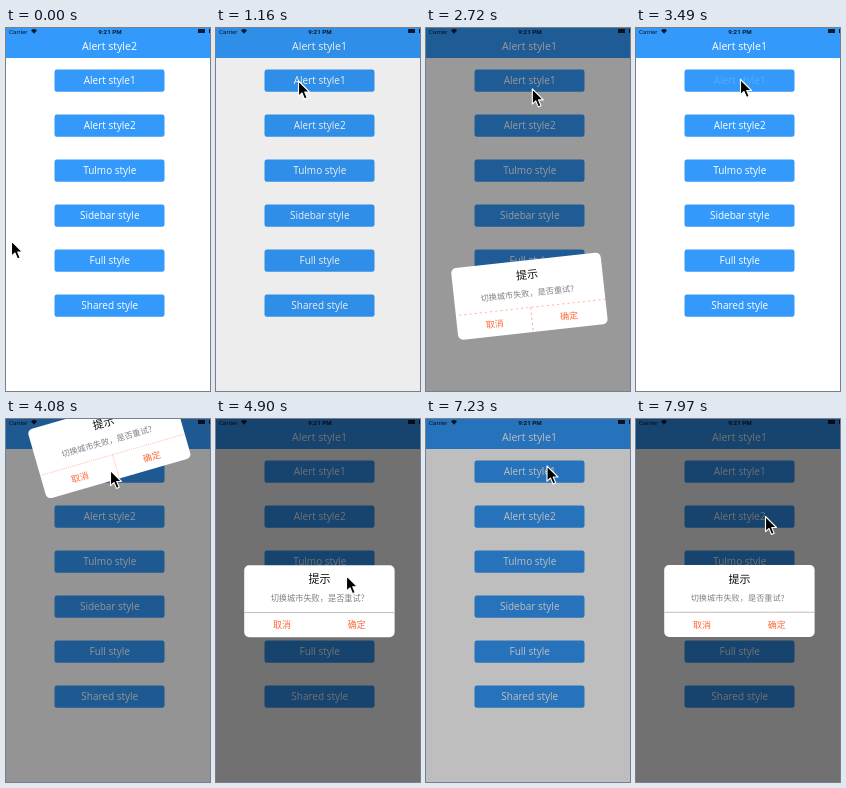
An HTML page for the animation above (8 s loop, 204 by 363 pixels).

```html
<!DOCTYPE html>
<html lang="en">
<head>
<meta charset="utf-8">
<title>Popup styles</title>
<style>
html, body { margin: 0; width: 100%; height: 100%; overflow: hidden; background: #fff; }
svg { display: block; width: 204px; height: 363px; }
text { text-anchor: middle; font-family: "Open Sans", "Noto Sans", sans-serif; }
.cjk text { font-family: "Noto Sans CJK SC", "Noto Sans CJK", "Noto Sans CJK JP", sans-serif; }
.bar text { font: 6.2px Roboto, "Liberation Sans", sans-serif; }
</style>
</head>
<body>
<svg viewBox="0 0 204 363">
  <rect width="204" height="363" fill="#fff"/>
  <rect width="204" height="30" fill="#3399fa"/>
  <g class="bar" fill="#0b1a2c">
    <text x="3" y="5.6" style="text-anchor:start">Carrier</text>
    <text x="104" y="5.6" style="font-weight:700">9:21 PM</text>
    <path d="M28 5.8 L25 2.4 Q28 -.4 31 2.4 Z"/>
    <rect x="192" y="1" width="7" height="4" rx=".5"/>
    <rect x="203" y="1" width="1" height="4"/>
  </g>
  <text id="title" x="103.5" y="22" font-size="10.6" fill="#fff"></text>
  <g id="buttons"></g>
  <rect id="mask" width="204" height="363" fill="#000"/>
  <g id="dialog" class="cjk">
    <rect x="-75.2" y="-36" width="150.4" height="72" rx="5" fill="#fff"/>
    <text y="-17.8" font-size="11" font-weight="500" fill="#111">提示</text>
    <text x="-1.8" y="0" font-size="8.2" fill="#808080">切换城市失败，是否重试?</text>
    <path id="rule" d="M-75 11.3 H75" fill="none"/>
    <path id="split" d="M0 11.3 V36" fill="none"/>
    <g font-size="9" fill="#ff6a3a">
      <text x="-37.5" y="27.2">取消</text>
      <text id="ok" x="37.3" y="27.2">确定</text>
    </g>
  </g>
  <path id="cursor" d="M0 0 V15.2 L3.5 12 L6 18 L8.7 16.8 L6.2 11 H11 Z"
    fill="#000" stroke="#fff" stroke-width="1.1" stroke-linejoin="round"/>
</svg>
<script>
const LOOP = 8000, DIM = 0.555, REST = 182.3, FALL = 363;
const $ = id => document.getElementById(id);
const set = (el, attrs) => { for (const k in attrs) el.setAttribute(k, attrs[k]); };

const labels = ["Alert style1", "Alert style2", "Tulmo style", "Sidebar style", "Full style", "Shared style"];
$("buttons").innerHTML = labels.map((label, i) => {
  const y = 41.5 + i * 45;
  return `<rect x="48.5" y="${y}" width="110" height="22.3" rx="2.4" fill="#3399fa"/>
    <text x="103.7" y="${y + 14.1}" font-size="10" fill="#fff">${label}</text>`;
}).join("");
const firstLabel = $("buttons").querySelector("text");

// [shown, dismissed]
const popups = [[1145, 2395], [3955, 5885], [7165, Infinity]];
const EXIT = 750;

// [time, x, y]
const track = [
  [20, 5.5, 213], [680, 82.5, 53],
  [2040, 82.5, 53], [2190, 107, 64.5],
  [2600, 107, 64.5], [2950, 104.5, 51.5],
  [4420, 104.5, 51.5], [4730, 113, 81], [4900, 130.5, 156.5], [5240, 132.5, 204.5],
  [6680, 132.5, 204.5], [7080, 121, 47],
  [7250, 121, 47], [7510, 129.5, 97.5]
];

const clamp = v => Math.min(1, Math.max(0, v));
const smooth = u => u * u * (3 - 2 * u);
const within = (t, a, b) => t >= a && t < b;

// The long sweep 4420-5240 speeds up, runs evenly, then slows down
const eases = { 4420: u => u * u, 4730: u => u, 4900: u => 1 - (1 - u) ** 2 };

// Damped spring from 0 to 1, time in seconds
function spring(s) {
  const w = 8.85, d = 9.08;
  return 1 - Math.exp(-d * s) * (Math.cos(w * s) + d / w * Math.sin(w * s));
}

function pointer(t) {
  const i = track.findIndex(k => k[0] > t);
  if (i === 0) return track[0].slice(1);
  if (i < 0) return track[track.length - 1].slice(1);
  const [t0, x0, y0] = track[i - 1], [t1, x1, y1] = track[i];
  const u = (eases[t0] || smooth)((t - t0) / (t1 - t0));
  return [x0 + (x1 - x0) * u, y0 + (y1 - y0) * u];
}

function popup(t) {
  const p = popups.find(([a, b]) => within(t, a, b + EXIT));
  if (!p) return { y: -FALL, angle: 0, dim: 0 };
  if (t < p[1]) {
    const s = (t - p[0]) / 1000, left = 1 - spring(s);
    return { y: -FALL * left, angle: -37 * left, dim: DIM * (1 - (1 - clamp(s / 0.25)) ** 2) };
  }
  const u = clamp((t - p[1]) / EXIT), gone = u ** 1.73;
  return { y: FALL * gone, angle: -26.5 * gone, dim: DIM * (1 - u ** 1.54) };
}

// Hairlines break into short dashes while tilted
function hairlines(angle) {
  const tilt = Math.abs(angle);
  const still = tilt < 0.25;
  const period = 0.57 / Math.tan(Math.max(tilt, 0.25) * Math.PI / 180);
  const dash = still ? "none" : `${period * 0.42} ${period * 0.58}`;
  const look = { stroke: still ? "#adadad" : "#ff8a66", "stroke-width": 0.8, "stroke-dasharray": dash };
  set($("rule"), { ...look, "stroke-dashoffset": still ? 0 : period * 0.42, opacity: still ? 1 : 0.75 });
  set($("split"), { ...look, opacity: still ? 0 : 0.85 });
}

function draw(t) {
  const { y, angle, dim } = popup(t);
  $("title").textContent = labels[t < 1150 ? 1 : 0];
  set(firstLabel, { opacity: within(t, 3480, 3955) ? 0.17 : 1 });
  set($("ok"), { opacity: within(t, 5470, 5890) ? 0.25 : 1 });
  set($("mask"), { opacity: dim });
  set($("dialog"), { transform: `translate(103.4 ${REST + y}) rotate(${angle})` });
  hairlines(angle);
  set($("cursor"), { transform: `translate(${pointer(t).join(" ")})` });
}

const start = performance.now();
function tick() {
  draw((performance.now() - start) % LOOP);
  requestAnimationFrame(tick);
}
tick();
</script>
</body>
</html>
```
